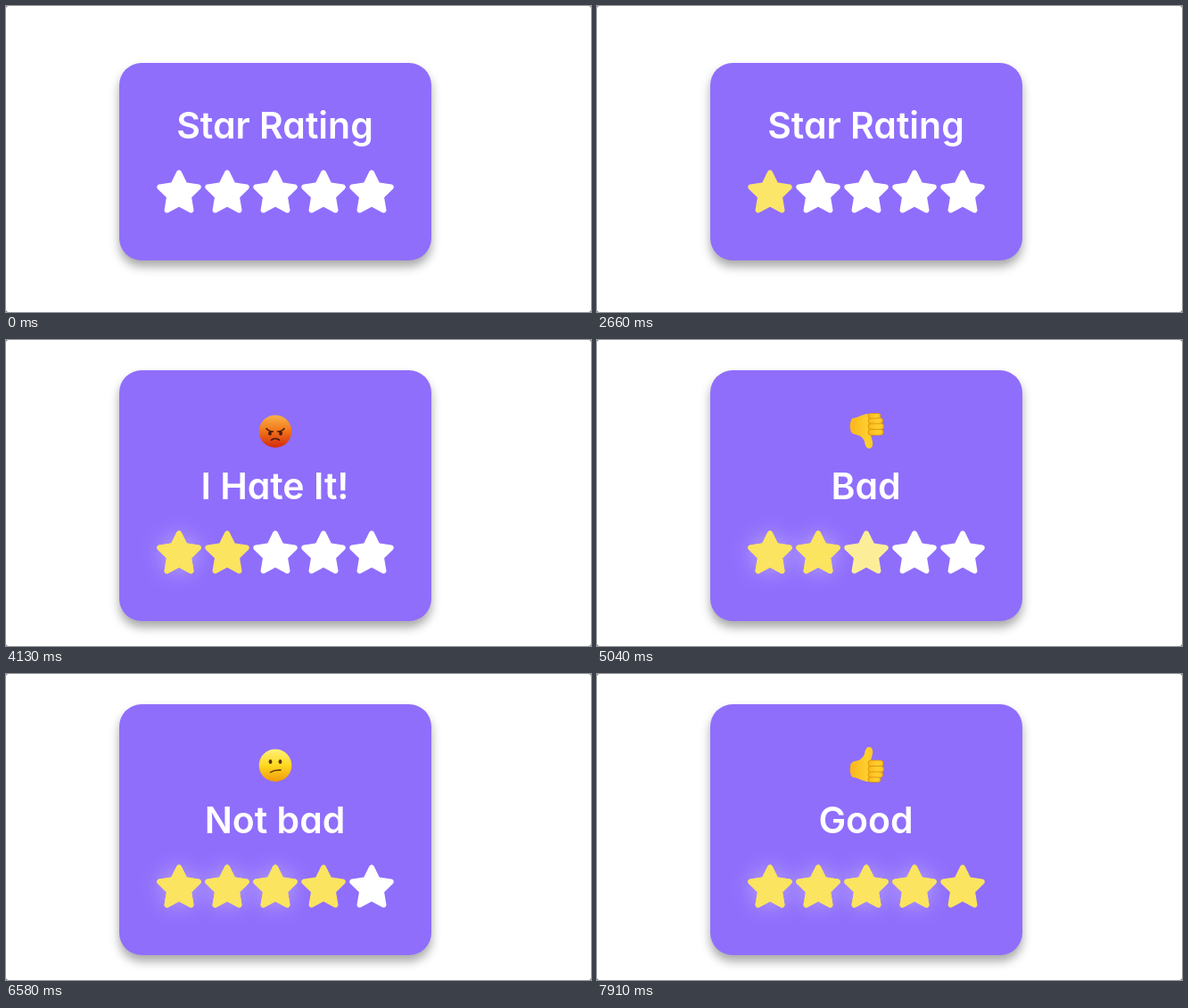
Write an HTML page that moves like this. It is 656 by 344 pixels and loops after 8000 ms.

```html
<!DOCTYPE html>
<html lang="en">
<head>
<meta charset="utf-8">
<title>Star Rating</title>
<style>
html, body { margin: 0; width: 100%; height: 100%; overflow: hidden; background: #777; }
svg { display: block; width: 656px; height: 344px; background: #fff; border-radius: 3px; }
#card { fill: #8f6efc; filter: drop-shadow(0 7px 5.5px rgba(0, 0, 0, .34)); }
#title { font: 600 41px Inter, "Open Sans", sans-serif; font-feature-settings: "cv11"; fill: #fff; text-anchor: middle; }
.glow { fill: #fbe45f; filter: drop-shadow(0 0 12px rgba(255, 255, 255, .38)); }
.finger { fill: url(#hand); stroke: #d98f08; stroke-width: .8; }
</style>
</head>
<body>
<svg viewBox="0 0 656 344">
  <defs>
    <path id="star" transform="scale(.09375)" d="M316.9 18C311.6 7 300.4 0 288.1 0s-23.4 7-28.8 18L195 150.3 51.4 171.5c-12 1.8-22 10.2-25.7 21.7s-.7 24.2 7.9 32.7L137.8 329 113.2 474.7c-2 12 3 24.2 12.9 31.3s23 8 33.8 2.3l128.3-68.5 128.3 68.5c10.8 5.7 23.9 4.9 33.8-2.3s14.9-19.3 12.9-31.3L438.5 329 542.7 225.9c8.6-8.5 11.7-21.2 7.9-32.7s-13.7-19.9-25.7-21.7L381.2 150.3z"/>
    <linearGradient id="red" x2="0" y2="1">
      <stop stop-color="#f9b24a"/><stop offset=".45" stop-color="#f2791b"/><stop offset="1" stop-color="#d42a0c"/>
    </linearGradient>
    <linearGradient id="yellow" x2="0" y2="1">
      <stop stop-color="#fff07a"/><stop offset=".5" stop-color="#ffd91f"/><stop offset="1" stop-color="#f19a0c"/>
    </linearGradient>
    <linearGradient id="hand">
      <stop stop-color="#f9b51b"/><stop offset=".6" stop-color="#ffd02e"/><stop offset="1" stop-color="#fcc21f"/>
    </linearGradient>
    <g id="thumb">
      <path fill="url(#hand)" d="M-18 2Q-18-3-13-4Q-5-5-2-12Q-1-20 3-20Q8-20 7-12L5-5H14V18Q4 21-6 17Q-12 14-16 14Q-19 9-18 2Z"/>
      <rect class="finger" x="2" y="-5" width="17" height="7" rx="3.3"/>
      <rect class="finger" x="2" y="1.5" width="17.5" height="7" rx="3.3"/>
      <rect class="finger" x="2" y="8" width="16.5" height="6.5" rx="3.2"/>
      <rect class="finger" x="2" y="14" width="14" height="5.5" rx="2.7"/>
    </g>
  </defs>
  <rect id="card" x="127" width="350" rx="25"/>
  <g transform="translate(302 102)">
    <g class="emoji">
      <circle cy=".7" r="18.3" fill="url(#red)"/>
      <path d="M-10-2.500Q-7 1-2.500 1M10-2.500Q7 1 2.500 1M-4.500 10.500Q0 7 4.500 10.500" fill="none" stroke="#4a1a0c" stroke-width="1.600" stroke-linecap="round"/>
      <g fill="#4a1a0c"><ellipse cx="-6" cy="3" rx="1.900" ry="2.400"/><ellipse cx="6" cy="3" rx="1.900" ry="2.400"/></g>
    </g>
    <use class="emoji" href="#thumb" transform="scale(1 -1)"/>
    <g class="emoji">
      <circle cy=".7" r="18.3" fill="url(#yellow)"/>
      <g fill="#5d3308"><ellipse cx="-5.500" cy="-3.500" rx="1.900" ry="2.600"/><ellipse cx="5.500" cy="-3.500" rx="1.900" ry="2.600"/></g>
      <path d="M-5.500 8.500Q-1 5.500 6 6" fill="none" stroke="#5d3308" stroke-width="1.500" stroke-linecap="round"/>
    </g>
    <use class="emoji" href="#thumb"/>
  </g>
  <text id="title" x="301.5"></text>
  <g id="glows"></g>
  <g id="stars"></g>
</svg>
<script>
const LOOP = 8000, STEP = 70, FADE = 200;
const hovers = [2510, 3900, 4960, 6360, 7290];
const clicks = [2730, 4410, 5740, 7000];
const labels = ["Star Rating", "I Hate It!", "Bad", "Not bad", "Good"];
const white = [255, 255, 255], gold = [251, 228, 95];

const $ = id => document.getElementById(id);
const emojis = document.querySelectorAll(".emoji");

function addStars(group, times, name) {
  return times.map((_, i) => {
    const star = document.createElementNS("http://www.w3.org/2000/svg", "use");
    star.setAttribute("href", "#star");
    star.setAttribute("x", 167 + 54 * i);
    star.setAttribute("class", name);
    return group.appendChild(star);
  });
}
const glows = addStars($("glows"), clicks, "glow");
const stars = addStars($("stars"), hovers, "star");

function fade(t, start) {
  const p = Math.min(1, Math.max(0, (t - start) / FADE));
  return 1 - (1 - p) ** 2;
}

function draw(now) {
  const t = Math.floor(now % LOOP / STEP) * STEP;
  const rating = clicks.filter(c => t >= c).length;
  const grow = rating ? 30 : 0;

  $("card").setAttribute("y", 64 - grow);
  $("card").setAttribute("height", 222 + 2 * grow);
  $("title").setAttribute("y", 148.5 + grow);
  $("title").textContent = labels[rating];
  for (const id of ["glows", "stars"]) $(id).setAttribute("transform", `translate(0 ${184.5 + grow})`);

  emojis.forEach((e, i) => e.style.display = i === rating - 1 ? "" : "none");
  glows.forEach((g, i) => g.style.opacity = fade(t, clicks[i]));
  stars.forEach((s, i) => {
    const k = fade(t, hovers[i]);
    s.style.fill = `rgb(${white.map((w, c) => Math.round(w + (gold[c] - w) * k))})`;
  });
}

function loop() {
  draw(performance.now());
  requestAnimationFrame(loop);
}
loop();
</script>
</body>
</html>
```
